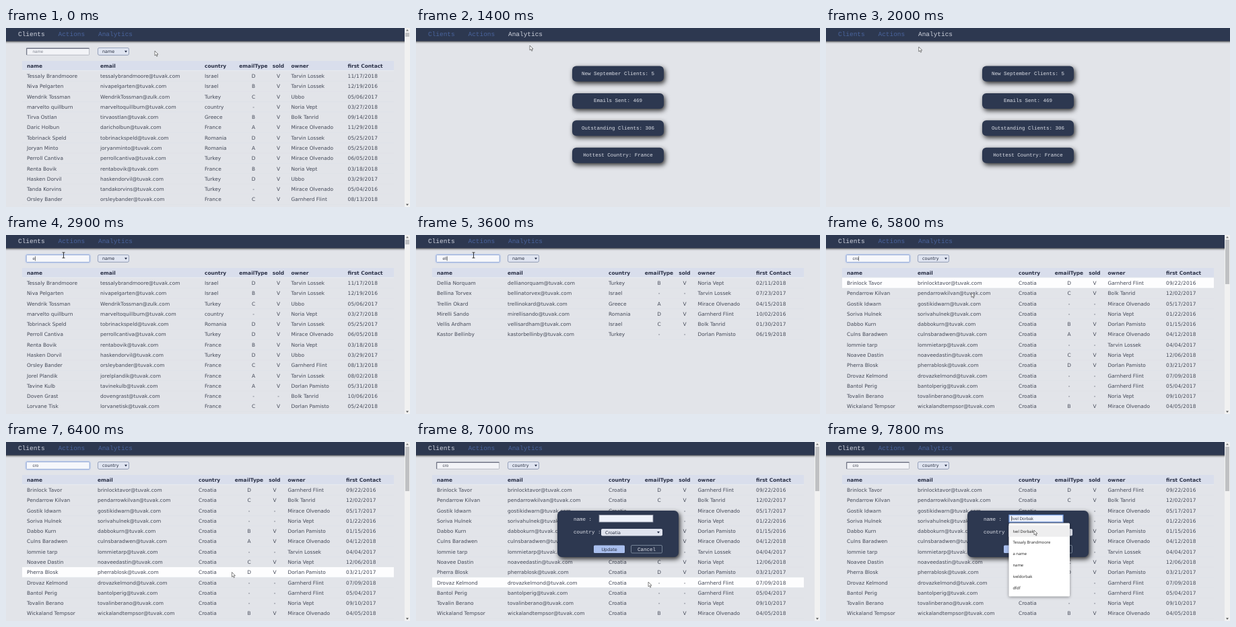
These frames come from a looping animation (600x266 px, 8000 ms). An HTML page:

```html
<!DOCTYPE html>
<html lang="en">
<head>
<meta charset="utf-8">
<title>Client list</title>
<style>
html, body { margin: 0; width: 100%; height: 100%; overflow: hidden; background: #e2e4e9; }
svg { display: block; width: 600px; height: 266px; }
text { font: 7.45px "DejaVu Sans", Verdana, sans-serif; fill: #434857; text-rendering: geometricPrecision; white-space: pre; }
.head { font-weight: bold; fill: #2b3147; }
.mid { text-anchor: middle; }
.date { letter-spacing: .18px; }
.nav { font: 9.45px "Liberation Mono", monospace; fill: #4a649d; }
.nav.on { fill: #cfd3de; }
.mono { font: 7.5px "Liberation Mono", monospace; fill: #dde0e8; }
.field { font: 6.3px "Liberation Sans", sans-serif; fill: #3f4350; }
.hint { fill: #858894; }
.pick { font-size: 6.4px; fill: #252b3d; }
.list { font: 5.9px "Open Sans", sans-serif; fill: #222; }
.bar { filter: drop-shadow(0 1px 1.4px rgba(0, 0, 0, .75)); }
.card { filter: drop-shadow(2.5px 3px 3.5px rgba(0, 0, 0, .8)); }
.soft { filter: drop-shadow(.5px .9px .7px rgba(40, 50, 80, .6)); }
.glow { filter: drop-shadow(0 0 .8px #8fb0f0); }
.menu { filter: drop-shadow(0 1px 2px rgba(0, 0, 0, .4)); }
</style>
</head>
<body>
<svg id="stage" viewBox="0 0 600 266"></svg>
<script>
const LOOP = 8000, STEP = 100, ROW = 15.28;
const NAVY = '#2d3850';
const owners = ['Tarvin Lossek', 'Ubbo', 'Noria Vept', 'Bolk Tanrid', 'Mirace Olvenado', 'Garnherd Flint', 'Dorlan Pamisto'];

// name, country, type + sold, owner index, first contact
const clients = `Tessaly Brandmoore,Israel,DV,0,11/17/2018
Niva Pelgarten,Israel,BV,0,12/19/2016
Wendrik Tossman,Turkey,CV,1,05/06/2017
marvelto quillburn,country,-V,2,03/27/2018
Tirva Ostlan,Greece,BV,3,09/14/2018
Daric Holbun,France,AV,4,11/29/2018
Tobrinack Speld,Romania,DV,0,05/25/2017
Joryan Minto,Romania,AV,4,05/25/2018
Perroll Cantiva,Turkey,DV,4,06/05/2018
Renta Bovik,France,BV,2,03/18/2018
Hasken Dorvil,Turkey,DV,1,03/29/2017
Tanda Korvins,Turkey,-V,4,05/04/2016
Orsley Bander,France,CV,5,08/13/2018
Jorel Plandik,France,AV,0,08/02/2018
Tavine Kulb,France,AV,6,05/31/2018
Doven Grast,France,--,3,10/06/2016
Lorvane Tisk,France,CV,6,05/24/2018
Dellia Norquam,Turkey,BV,2,02/11/2018
Bellina Torvex,Israel,--,0,07/23/2017
Trellin Okard,Greece,AV,4,04/15/2018
Mirelli Sando,Romania,DV,5,10/02/2016
Vellis Ardham,Israel,CV,3,01/30/2017
Kastor Bellinby,Turkey,--,6,06/19/2018
Brinlock Tavor,Croatia,DV,5,09/22/2016
Pendarrow Kilvan,Croatia,CV,3,12/02/2017
Gostik Idwarn,Croatia,--,4,05/17/2017
Soriva Hulnek,Croatia,--,2,01/22/2016
Dabbo Kurn,Croatia,BV,6,01/15/2016
Culns Baradwen,Croatia,AV,4,04/12/2018
lommie tarp,Croatia,--,0,04/04/2017
Noavee Dastin,Croatia,CV,2,12/06/2018
Pherra Blosk,Croatia,DV,6,03/21/2017
Drovaz Kelmond,Croatia,--,5,07/09/2018
Bantol Perig,Croatia,--,5,05/04/2017
Tovalin Berano,Croatia,--,2,09/10/2017
Wickaland Tempsor,Croatia,BV,4,04/05/2018`.split('\n').map((line, i) => {
  const [name, country, flags, owner, date] = line.split(',');
  const id = name.replace(' ', '');
  const email = i === 2 ? id + '@zulk.com' : id.toLowerCase() + '@tuvak.com';
  return { name, country, cells: [name, email, country, flags[0], flags[1], owners[owner], date] };
});

const titles = ['name', 'email', 'country', 'emailType', 'sold', 'owner', 'first Contact'];
const layouts = {
  wide: [31, 140, 295, 367.5, 404.5, 423.5, 507.5],
  tight: [31, 136, 286, 361, 399, 418.5, 505],
  empty: [31, 103, 175, 297, 357, 383, 461]
};
const columnClass = ['', '', '', 'mid', 'mid', '', 'date'];
const thumbs = { '': 6, e: 7, c: 22, cr: 66, cro: 66 };

// pointer path: time, x, y
const path = [
  [0, 221, 34], [1399, 221, 34], [1400, 169, 26], [1700, 171, 34], [1900, 171, 34],
  [2300, 38, 10], [2500, 58, 18], [2700, 85.5, 30], [4000, 85.5, 30], [4300, 160, 36],
  [4500, 160, 61], [4600, 160, 61], [4900, 45, 36], [5400, 45, 36], [5700, 205, 74],
  [5800, 216, 85.5], [6300, 333, 190], [6400, 335.5, 193.5], [6800, 345, 208],
  [7000, 345, 208], [7200, 308, 115], [7500, 305, 115], [7700, 309, 131], [8000, 309, 131]
];
const typing = [[0, ''], [2900, 'e'], [3200, 'el'], [3500, 'ell'], [3800, 'elli'], [5200, 'c'], [5300, 'cr'], [5500, 'cro']];

const within = (v, a, b) => v >= a && v < b;
const rect = (x, y, w, h, fill, more = '') => `<rect x="${x}" y="${y}" width="${w}" height="${h}" fill="${fill}" ${more}/>`;
const text = (x, y, s, cls = '') => `<text x="${x}" y="${y}" class="${cls}">${s}</text>`;
const line = (d, stroke, width = 1) => `<path d="${d}" fill="none" stroke="${stroke}" stroke-width="${width}"/>`;
const shape = (d, fill) => `<path d="${d}" fill="${fill}"/>`;

function pointerAt(t) {
  const i = Math.max(1, path.findIndex(p => p[0] >= t));
  const [t0, x0, y0] = path[i - 1], [t1, x1, y1] = path[i];
  const k = (t - t0) / (t1 - t0);
  return [x0 + (x1 - x0) * k, y0 + (y1 - y0) * k];
}

function pointer(t) {
  const [x, y] = pointerAt(t);
  const overInput = within(x, 30, 124) && within(y, 29, 41);
  const overName = t >= 7200 && within(y, 108, 119);
  if (overInput || overName)
    return line(`M${x - 2} ${y - 4}h4M${x} ${y - 4}v8M${x - 2} ${y + 4}h4`, '#222', .9);
  return `<path d="M${x} ${y}v7l1.6-1.4 1.2 2.6 1.2-.6-1.2-2.5h2.2z" fill="#fff" stroke="#333" stroke-width=".6"/>`;
}

function navBar(page, width) {
  const links = [['Clients', 18], ['Actions', 77.5], ['Analytics', 137]];
  return rect(-10, -10, width + 20, 29.5, NAVY, 'class="bar"') +
    links.map(([s, x]) => text(x, 12.3, s, s === page ? 'nav on' : 'nav')).join('');
}

function scrollBar(h) {
  return rect(592, 0, 8, 266, '#f1f1f1') + rect(593, 7, 6, h, '#bfc0c3') +
    shape('M594 4.5h4l-2-2.5z', '#777') + shape('M594 261.5h4l-2 2.5z', '#555');
}

function searchBox(t, query, typedAt) {
  const focus = within(t, 2700, 4300) || within(t, 5000, 7000);
  const selected = within(t, 5000, 5200);
  const caretX = 39.5 + { '': 0, e: 3.5, el: 4.9, ell: 6.3, elli: 7.7, c: 3.2, cr: 5.3, cro: 8.8 }[query];
  let s = focus
    ? rect(30.2, 29.6, 94, 10.8, '#f6f7fb', 'rx="1" class="glow" stroke="#8ea4d3" stroke-width=".9"')
    : rect(30.4, 29.8, 93.2, 10.4, '#f2f3f7', 'rx="1" stroke="#a9acb8" stroke-width=".8"') + line('M30.7 40V30.3H123.6', '#6e7283', 1.2);
  if (selected) s += rect(39, 31.2, 8.6, 7.6, '#3a78d8');
  s += query ? text(39.5, 37.3, query, 'field') : text(39.5, 37.3, 'name', 'field hint');
  const blink = (t - Math.max(typedAt, 2700)) % 1000 < 500;
  if (focus && !selected && blink) s += rect(caretX, 31.6, .6, 6.8, '#222');
  return s;
}

function picker(t, value) {
  const active = within(t, 4300, 5000);
  return rect(136.5, 29.6, 46, 10.6, '#dfe4f0', `rx="2.2" class="soft" stroke="${active ? '#5f8bd6' : '#8795b6'}" stroke-width="${active ? 1 : .6}"`) +
    text(143, 37.2, value, 'pick') + shape('M176 33.8h4l-2 2.7z', '#222b44');
}

function options(t) {
  const active = Math.max(0, Math.min(2, Math.floor((pointerAt(t)[1] - 42) / 8)));
  return rect(136.5, 41.5, 46, 33, '#f3f4f8', 'stroke="#8a93aa" stroke-width=".5"') +
    ['name', 'email', 'country', 'owner'].map((s, i) =>
      (i === active ? rect(137, 42 + 8 * i, 45, 8, '#bccbef') : '') + text(143, 48.2 + 8 * i, s, 'pick')).join('');
}

function table(t, rows, xs) {
  const cells = values => (y, cls) => values.map((v, c) => text(xs[c], y, v, cls || columnClass[c])).join('');
  const header = titles.map((s, c) => text(xs[c], 58.6, s, c === 3 || c === 4 ? 'head mid' : 'head')).join('');
  let s = rect(24, 49, 552, 14, '#d9deec') + line('M24 63.4H576', '#edeff4', .7) + header;
  // hover styling trails the pointer by one step
  const hoverY = pointerAt(Math.max(0, t - STEP))[1];
  const hover = within(t, 5600, 7200) ? Math.floor((hoverY - 63.7) / ROW) : -1;
  rows.slice(0, 13).forEach((r, i) => {
    const top = 63.7 + i * ROW;
    if (i === hover) s += rect(24, top, 552, ROW, '#fdfdfe');
    s += line(`M24 ${top + ROW}H576`, '#dbdee6', .5) + cells(r.cells)(74 + i * ROW);
  });
  return s;
}

function dialog(t) {
  const focus = t >= 7300, open = t >= 7500, hover = t >= 7700;
  let s = rect(210, 102, 180, 69, NAVY, 'rx="6.5" class="card"') +
    text(234, 116.6, 'name :', 'mono') + text(234, 136.4, 'country :', 'mono') +
    rect(272, 108.5, 80, 10.5, '#eef2fb', `stroke="${focus ? '#79a0e6' : '#8b90a0'}" stroke-width="${focus ? 1.3 : .8}"`) +
    rect(275, 129, 91, 10.5, '#dfe3ee', 'rx="2"') + text(281, 136.7, 'Croatia', 'pick') + shape('M358 133h4l-2 2.7z', '#222b44') +
    rect(264, 153.5, 46, 11.5, '#a9bfee', 'rx="1.5"') + text(287, 161.5, 'Update', 'pick mid') +
    rect(319.5, 153.5, 46, 11.5, NAVY, 'rx="1.5" stroke="#8796a8" stroke-width=".8"') +
    text(342.5, 161.7, 'Cancel', 'mono mid');
  if (hover) s += text(276, 116, 'Ivel Dorbak', 'field');
  if (focus) s += rect(275.2, 110, .6, 7.4, '#222');
  if (open) {
    const names = ['Ivel Dorbak', clients[0].name, 'a name', 'name', 'iveldorbak', 'dfdf'];
    s += rect(271.5, 120.5, 90.5, 109, '#fff', 'rx="1.5" class="menu"');
    if (hover) s += rect(271.5, 124, 90.5, 16.8, '#eeeeef');
    s += names.map((n, i) => text(277.5, 134.6 + 16.85 * i, n, 'list')).join('');
  }
  return s;
}

function analytics() {
  const lines = ['New September Clients: 5', 'Emails Sent: 469', 'Outstanding Clients: 306', 'Hottest Country: France'];
  return lines.map((s, i) => rect(232, 56.5 + 40.4 * i, 136, 23, NAVY, 'rx="6" class="card"') +
    text(300, 70 + 40.4 * i, s, 'mono mid')).join('');
}

function clientPage(t) {
  const [typedAt, query] = typing.filter(k => k[0] <= t).pop();
  const key = t < 4500 ? 'name' : 'country';
  const rows = clients.filter(c => c[key].toLowerCase().includes(query));
  const layout = !rows.length ? 'empty' : /^e?$/.test(query) ? 'wide' : 'tight';
  const thumb = rows.length && thumbs[query];
  return table(t, rows, layouts[layout]) + searchBox(t, query, typedAt) + picker(t, key) +
    (within(t, 4300, 4500) ? options(t) : '') +
    navBar('Clients', 600) + (thumb ? scrollBar(thumb) : '') +
    (t >= 7000 ? dialog(t) : '');
}

function scene(t) {
  const page = within(t, 1400, 2300) ? analytics() + navBar('Analytics', 600) : clientPage(t);
  return rect(0, 0, 600, 266, '#e2e4e9') + page + pointer(t);
}

const stage = document.getElementById('stage');
const start = performance.now();
let shown = -1;
function tick() {
  const t = Math.floor((performance.now() - start) % LOOP / STEP) * STEP;
  if (t !== shown) stage.innerHTML = scene(shown = t);
  requestAnimationFrame(tick);
}
tick();
</script>
</body>
</html>
```
